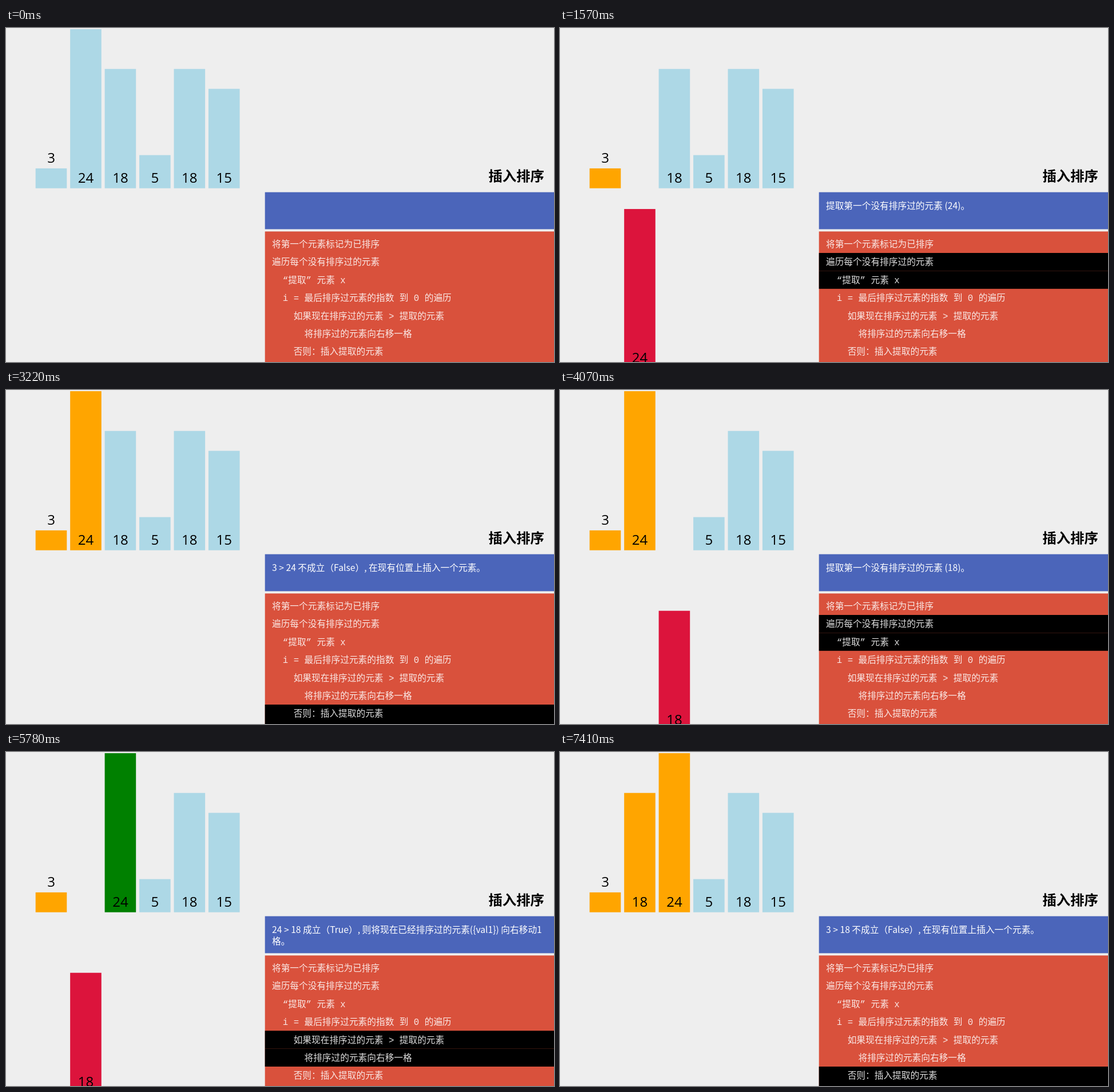
Write an HTML page with a canvas that moves like this. It is 958 by 585 pixels and loops after 8000 ms.

```html
<!DOCTYPE html>
<html lang="zh-CN">
<head>
<meta charset="utf-8">
<title>插入排序</title>
<style>
html, body { margin: 0; width: 100%; height: 100%; overflow: hidden; background: #eee; }
canvas { display: block; }
</style>
</head>
<body>
<canvas id="stage" width="958" height="585"></canvas>
<script>
const LOOP = 8000, DURATION = 250;
const ctx = document.getElementById('stage').getContext('2d');
const CJK = '"Noto Sans CJK SC", "Noto Sans CJK", sans-serif';

const BLUE = [173, 216, 230], ORANGE = [255, 165, 0], RED = [220, 20, 60], GREEN = [0, 128, 0];
const values = [3, 24, 18, 5, 18, 15];

const code = [
  '将第一个元素标记为已排序',
  '遍历每个没有排序过的元素',
  '  “提取” 元素 x',
  '  i = 最后排序过元素的指数 到 0 的遍历',
  '    如果现在排序过的元素 > 提取的元素',
  '      将排序过的元素向右移一格',
  '    否则：插入提取的元素'
];

const extract = v => `提取第一个没有排序过的元素 (${v})。`;
const compare = v => `找出插入提取元素的地方；和已经排序过的元素 ${v} 比较。`;
const insert = (a, b) => `${a} > ${b} 不成立（False）, 在现有位置上插入一个元素。`;

// at..end: span of the change; frames: pictures in it; set: new properties by bar
const steps = [
  { at: 0, end: 1, frames: 2, text: '', rows: [], set: {} },
  { at: 500, end: 650, frames: 3, text: '将第一个元素 (3) 标记为已排序。', rows: [0],
    set: { 0: { fill: ORANGE } } },
  { at: 1340, end: 1570, frames: 4, text: extract(24), rows: [1, 2],
    set: { 1: { fill: RED, drop: 1 } } },
  { at: 2120, end: 2360, frames: 4, text: compare(3), rows: [3],
    set: { 0: { fill: GREEN } } },
  { at: 2990, end: 3220, frames: 4, text: insert(3, 24), rows: [6],
    set: { 0: { fill: ORANGE }, 1: { fill: ORANGE, drop: 0 } } },
  { at: 3830, end: 4070, frames: 4, text: extract(18), rows: [1, 2],
    set: { 2: { fill: RED, drop: 1 } } },
  { at: 4700, end: 4850, frames: 3, text: compare(24), rows: [3],
    set: { 1: { fill: GREEN } } },
  { at: 5460, end: 5780, frames: 5, rows: [4, 5],
    text: '24 > 18 成立（True）, 则将现在已经排序过的元素({val1}) 向右移动1\n格。',
    set: { 1: { slot: 2 }, 2: { slot: 1 } } },
  { at: 6330, end: 6560, frames: 4, text: compare(3), rows: [3],
    set: { 0: { fill: GREEN }, 1: { fill: ORANGE } } },
  { at: 7170, end: 7410, frames: 4, text: insert(3, 18), rows: [6],
    set: { 0: { fill: ORANGE }, 2: { fill: ORANGE, drop: 0 } } }
];

let bars = values.map((v, slot) => ({ slot, drop: 0, fill: BLUE }));
for (const step of steps) {
  step.from = bars;
  step.to = bars = bars.map((bar, i) => ({ ...bar, ...step.set[i] }));
}

const mix = (a, b, p) => a + (b - a) * p;
const ease = p => p < .5 ? 4 * p ** 3 : 1 - 4 * (1 - p) ** 3;

// Progress moves in held pictures; shorter spans begin further into the motion.
function progress(step, t) {
  if (t >= step.end) return 1;
  const interval = (step.end - step.at) / (step.frames - 1);
  const held = Math.floor((t - step.at) / interval) * interval;
  return ease(Math.min(1, (held + (5 - step.frames) * 38) / DURATION));
}

function rect(x, y, w, h, fill) {
  ctx.fillStyle = fill;
  ctx.fillRect(x, y, w, h);
}

function panel(top, bottom, fill) {
  rect(452.7, top, 506, bottom - top, fill);
}

function write(text, x, y, font, fill, align = 'left') {
  ctx.font = font;
  ctx.fillStyle = fill;
  ctx.textAlign = align;
  ctx.fillText(text, x, Math.round(y));
}

function drawBar(v, a, b, p) {
  const x = 51.7 + 60.45 * mix(a.slot, b.slot, p);
  const base = 280.7 + 315 * mix(a.drop, b.drop, p);
  const height = v * 11.61;
  const fill = a.fill.map((c, i) => Math.round(mix(c, b.fill[i], p)));
  rect(x, base - height, 54.6, height, `rgb(${fill})`);
  const label = height < 40 ? base - height - 10 : base - 10;
  write(v, x + 27.3, label, '24px "Open Sans", "Noto Sans", sans-serif', '#000', 'center');
}

const rowTop = i => i ? 394 + 31.4 * (i - 1) : 356.4;

function draw(t) {
  const step = steps.findLast(s => s.at <= t);
  const p = progress(step, t);
  rect(0, 0, 958, 585, '#eee');
  values.forEach((v, i) => drawBar(v, step.from[i], step.to[i], p));

  write('插入排序', 941, 268, `bold 24.4px ${CJK}`, '#000', 'right');
  panel(287.6, 352.4, '#4b65ba');
  step.text.split('\n').forEach((line, i) =>
    write(line, 465, 316.5 + 20 * i, `500 15.7px ${CJK}`, '#fff'));

  panel(rowTop(0), 585, '#d9513c');
  for (const i of step.rows) panel(rowTop(i), i === 6 ? 585 : rowTop(i + 1), '#000');
  code.forEach((line, i) =>
    write(line, 465, 384 + 31.4 * i, `300 15.7px "Liberation Mono", ${CJK}, monospace`, '#ffffffdd'));
}

const start = performance.now();
function tick() {
  draw((performance.now() - start) % LOOP);
  requestAnimationFrame(tick);
}
tick();
</script>
</body>
</html>
```
